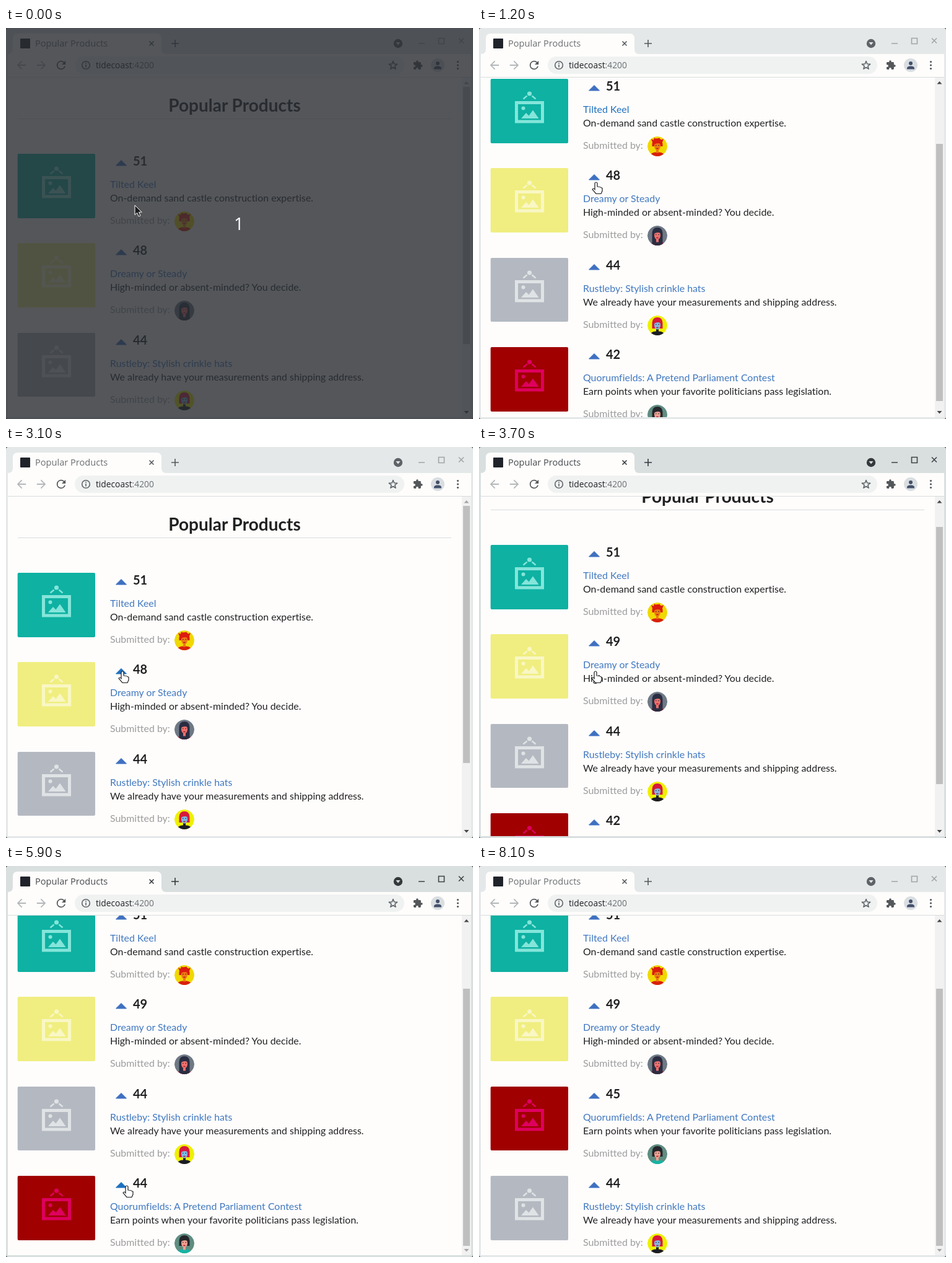
An HTML page for the animation above (8.3 s loop, 754 px wide and 631 px high).

```html
<!DOCTYPE html>
<html lang="en">
<head>
<meta charset="utf-8">
<title>Popular Products</title>
<style>
  html, body { margin: 0; width: 100%; height: 100%; overflow: hidden; background: #50555a; }
  svg { display: block; }
  text { font: 15.91px Lato, sans-serif; font-variant-ligatures: none; fill: #212121; white-space: pre; }
  .heading { font-size: 28px; font-weight: 700; text-anchor: middle; }
  .votes { font-size: 20px; font-weight: 700; }
  .link { fill: #4078c0; }
  .up { fill: #3f70c1; stroke: #3f70c1; stroke-width: 1; stroke-linejoin: round; }
  .link.hover { fill: #1e70bf; }
  .up.hover { fill: #1e70bf; stroke: #1e70bf; }
  .note { fill: #9c9c9c; }
  .ui { font-family: "Open Sans", "Noto Sans", sans-serif; }
  .tab { font-size: 14.6px; fill: var(--label); }
  .url { font-size: 13.8px; fill: #202124; }
  .count { font-size: 28px; fill: #fff; text-anchor: middle; }
  .line { fill: none; stroke-width: 1.6; }
  #window { --bar: #e4e8e8; --label: #6b6e70; --button: #a0a5a5; --badge: #5f6368; --plus: #55595c; }
  #window.active { --bar: #d9dfdf; --label: #46494c; --button: #3f4346; --badge: #35393c; --plus: #35393c; }
</style>
</head>
<body>
<svg id="stage" width="754" height="631" viewBox="0 0 754 631"></svg>
<script>
const LOOP = 8300, STEP = 100;
const FIRST_TOP = 203, PITCH = 144.33, IMAGE_HEIGHT = 103.6;

// Hair ends at `length`, measured down from the middle of the portrait.
const products = [
  { title: "Tilted Keel", text: "On-demand sand castle construction expertise.",
    back: "#0eb1a2", icon: "#84e5da", votes: [[0, 51]],
    face: { back: "#f0d800", hair: "#dc1c10", skin: "#f07a12", body: "#d8200c", length: 0, spikes: true } },
  { title: "Dreamy or Steady", text: "High-minded or absent-minded? You decide.",
    back: "#f0ee80", icon: "#f9f7c4", votes: [[0, 48], [3300, 49]],
    face: { back: "#6f7985", hair: "#2a2d42", skin: "#ee716d", body: "#d3222c", length: 16 } },
  { title: "Rustleby: Stylish crinkle hats", text: "We already have your measurements and shipping address.",
    back: "#b4b9c1", icon: "#e0e3e5", votes: [[0, 44]],
    face: { back: "#eef000", hair: "#d8183c", skin: "#7fb9e4", body: "#1b1b24", length: 5 } },
  { title: "Quorumfields: A Pretend Parliament Contest", text: "Earn points when your favorite politicians pass legislation.",
    back: "#a00000", icon: "#de005e", votes: [[0, 42], [5200, 43], [5900, 44], [7000, 45]],
    face: { back: "#5f8d80", hair: "#25262c", skin: "#f0a090", body: "#17b3a3", length: 4 } },
];

// Each row: time, value(s) held until the next row.
const scrolls = [[0, 0], [1200, 121], [1300, 136], [1700, 133], [1800, 122], [1900, 105], [2000, 82],
  [2100, 42], [2200, 6], [2400, 0], [3500, 4], [3600, 20], [3700, 45], [3800, 72], [3900, 98],
  [4000, 118], [4100, 130], [4200, 136]];
const pointers = [[0, 209, 287], [600, 203, 276], [700, 194, 258], [800, 189, 249], [2400, 189, 256],
  [2500, 189, 280], [2600, 188, 318], [2700, 187, 350], [2800, 187, 361], [3100, 188, 362],
  [4200, 188, 366], [4300, 198, 336], [4400, 198, 352], [4500, 196, 400], [4600, 194, 440],
  [4700, 193, 490], [4800, 194, 516], [5000, 194, 518], [5200, 195, 516], [7100, 205, 480],
  [7200, 235, 360], [7300, 290, 112], [7400, 300, -60]];
const veils = [[0, 1], [400, .85], [500, .66], [600, .46], [700, .26], [800, .1], [900, 0]];

const at = (rows, t) => rows.findLast(row => row[0] <= t);
const byId = id => document.getElementById(id);
const path = (d, attrs) => `<path d="${d}" ${attrs}/>`;
const rect = (x, y, w, h, fill, more = "") =>
  `<rect x="${x}" y="${y}" width="${w}" height="${h}" fill="${fill}" ${more}/>`;
const dot = (x, y, r, fill) => `<circle cx="${x}" cy="${y}" r="${r}" fill="${fill}"/>`;
const text = (x, y, cls, body) => `<text x="${x}" y="${y}" class="${cls}">${body}</text>`;
const icon = (x, y, scale, d, fill) =>
  path(d, `fill="${fill}" transform="translate(${x} ${y}) scale(${scale}) translate(-12 -12)"`);

const star = Array.from({ length: 10 }, (_, i) => {
  const a = i * Math.PI / 5 - Math.PI / 2, r = i % 2 ? 3 : 7;
  return `${625 + r * Math.cos(a)},${60.5 + r * Math.sin(a)}`;
}).join(" ");

function portrait(f) {
  const spikes = f.spikes ? path("M-10 -12l4 2 1-4 4 3 4-3 2 4 5-2-3 8h-14z", `fill="${f.hair}"`) : "";
  return `<g transform="translate(288 109)" clip-path="url(#round)">
    ${dot(0, 0, 16, f.back)}
    ${path("M-12 17Q-11 10 -3 9.500H3Q11 10 12 17Z", `fill="${f.body}"`)}
    ${path(`M-8.500 ${f.length}V-4Q-8 -13 0 -13T8.500 -4V${f.length}Z`, `fill="${f.hair}"`)}
    ${spikes}
    ${rect(-2, 4, 4, 6.5, f.length === 5 ? f.body : f.skin)}
    <ellipse cy="-.5" rx="5" ry="7.200" fill="${f.skin}"/>
    ${path("M-6 -3Q-4 -10 1 -9T6 -3Q2 -7 -6 -3Z", `fill="${f.hair}"`)}
    ${dot(-2.2, -1.5, .8, "#222")}${dot(2.2, -1.5, .8, "#222")}
    ${path("M-1.700 3.500h3.400", 'stroke="#b01828" stroke-width="1.300"')}
  </g>`;
}

function picture(p, i) {
  return rect(18.7, 0, 125.3, 104, p.back, `rx="2" id="image${i}"`) + dot(81.5, 24, 3.6, p.icon)
    + path("M77.500 27.500L71.500 32.500M85.500 27.500L91.500 32.500", `stroke="${p.icon}" stroke-width="2.400"`)
    + path("M58 36h47v35.500h-47zM63 41v25.500h37v-25.500z", `fill="${p.icon}" fill-rule="evenodd"`)
    + dot(71.5, 47.5, 3, p.icon)
    + path("M68 64l8-9 4.500 4.500 6.500-9 9.500 13.500z", `fill="${p.icon}"`);
}

const item = (p, i) => `<g id="item${i}">
  ${picture(p, i)}
  ${path("M177.500 19h17l-8.500-8.500z", `class="up" id="up${i}"`)}
  <text x="205" y="19" class="votes" id="votes${i}"></text>
  <text x="168" y="55" class="link" id="link${i}">${p.title}</text>
  ${text(168, 77, "", p.text)}
  ${text(168, 113, "note", "Submitted by:")}
  ${portrait(p.face)}
</g>`;

const BACK = "M20 11H7.830l5.590-5.590L12 4l-8 8 8 8 1.410-1.410L7.830 13H20z";
const RELOAD = "M17.650 6.350A7.960 7.960 0 0 0 12 4a8 8 0 1 0 7.730 10h-2.080A6 6 0 1 1 12 6c1.660 0 3.140.690 4.220 1.780L13 11h7V4z";
const PUZZLE = "M20.500 11H19V7a2 2 0 0 0-2-2h-4V3.500a2.500 2.500 0 0 0-5 0V5H4a2 2 0 0 0-2 2v3.800h1.500a2.700 2.700 0 0 1 0 5.400H2V20a2 2 0 0 0 2 2h3.800v-1.500a2.700 2.700 0 0 1 5.400 0V22H17a2 2 0 0 0 2-2v-4h1.500a2.500 2.500 0 0 0 0-5z";

const tabStrip = `
  ${rect(0, 0, 754, 631, "var(--bar)", 'rx="4"')}
  ${rect(3, 42, 748, 586, "#fefdfc")}
  ${path("M3 42Q11 42 11 34V17Q11 9 19 9H243Q251 9 251 17V34Q251 42 259 42Z", 'fill="#fefdfc"')}
  ${rect(23, 17, 16, 16, "#20232a", 'rx="1"')}
  ${text(47, 30, "ui tab", "Popular Products")}
  ${path("M231.500 21.500l7 7m0-7l-7 7M267 25h12M273 19v12", 'class="line" stroke="var(--plus)"')}
  ${dot(633, 25, 7.2, "var(--badge)")}
  ${path("M629.500 23h7l-3.500 4.500z", 'fill="var(--bar)"')}
  ${path("M666 25h10M698.500 16.500h9v9h-9zM731 16.500l8 8m0-8l-8 8", 'class="line" stroke="var(--button)"')}`;

const toolbar = `
  ${icon(25, 60, .9, BACK, "#b4b7b8")}
  <g transform="translate(114 0) scale(-1 1)">${icon(57, 60, .9, BACK, "#b4b7b8")}</g>
  ${icon(89, 60, .9, RELOAD, "#54585b")}
  ${rect(111, 46, 532, 28, "#eff2f1", 'rx="14"')}
  <circle cx="129" cy="60" r="6.300" class="line" stroke="#5f6368"/>
  ${rect(128.2, 59, 1.6, 4.5, "#5f6368")}${rect(128.2, 56, 1.6, 1.7, "#5f6368")}
  <text x="145" y="65" class="ui url">tidecoast<tspan fill="#6b6f72">:4200</tspan></text>
  <polygon points="${star}" class="line" stroke="#5f6368" stroke-linejoin="round"/>
  ${icon(665, 60, .7, PUZZLE, "#54585b")}
  ${dot(697, 60, 11, "#d9dee1")}${dot(697, 57, 3, "#44506a")}
  ${path("M691 66.500v-1.500q0-3.500 6-3.500t6 3.500v1.500z", 'fill="#44506a"')}
  ${[54.5, 60, 65.5].map(y => dot(729.5, y, 1.6, "#54585b")).join("")}
  ${rect(3, 79, 748, 1, "#d8dbdb")}`;

byId("stage").innerHTML = `
  <defs><clipPath id="round"><circle r="16"/></clipPath></defs>
  <g id="window">${tabStrip}${toolbar}
    <svg x="0" y="80" width="736" height="548" overflow="hidden"><g id="page">
      ${text(369, 135, "heading", "Popular Products")}
      ${rect(19, 146, 700, 1, "#dcdcdc")}
      ${products.map(item).join("")}
    </g></svg>
    ${rect(736, 80, 15, 548, "#f0f1f0")}
    ${rect(738, 95, 11, 415, "#bfbfbf", 'id="thumb"')}
    ${path("M739.500 90.500h8l-4-4.500z", 'id="upper"')}
    ${path("M739.500 618h8l-4 4.500z", 'id="lower"')}
  </g>
  <g id="veil">${rect(0, 0, 754, 631, "#2a2d32", 'fill-opacity=".8"')}${text(376, 326, "ui count", "1")}</g>
  <g id="pointer">
    ${path("M-1 -1V14.500L2.700 11.200 5.200 17 8 15.800 5.500 10.200H10.200Z", 'id="arrow" fill="#1c1c1c" stroke="#fff" stroke-width="1"')}
    ${path("M-2 2a2 2 0 0 1 4 0V7q5 0 8 2.500v4.500l-2 4.500H0l-6-7q1.500-3 4 0z", 'id="hand" fill="#fff" stroke="#1c1c1c" stroke-width="1.200"')}
  </g>`;

// Exact, unrounded top of a product on the page.
const itemTop = (i, t) => FIRST_TOP + PITCH * (t >= 7000 && i > 1 ? 5 - i : i);

// Names the part under the pointer, such as "up2" or "link0".
function hit(t) {
  const [, x, y] = at(pointers, t), scroll = at(scrolls, t)[1];
  for (let i = 0; i < products.length; i++) {
    const dy = y - itemTop(i, t) + scroll;
    if (x > 176 && x < 197 && dy > 7 && dy < 23) return "up" + i;
    if (x > 168 && x < 240 && dy > 42 && dy < 60) return "link" + i;
  }
  return "";
}

function draw(t) {
  const scroll = at(scrolls, t)[1], [, x, y] = at(pointers, t);
  const hovered = hit(Math.max(0, t - STEP)), over = hit(t);
  byId("window").classList.toggle("active", t >= 3200 && t < 8100);
  byId("page").setAttribute("transform", `translate(0 ${-80 - scroll})`);
  products.forEach((p, i) => {
    const top = itemTop(i, t), snapped = Math.round(top);
    byId("item" + i).setAttribute("transform", `translate(0 ${snapped})`);
    byId("image" + i).setAttribute("height", Math.round(top + IMAGE_HEIGHT) - snapped);
    byId("votes" + i).textContent = at(p.votes, t)[1];
    for (const id of ["up" + i, "link" + i]) byId(id).classList.toggle("hover", id === hovered);
  });
  byId("thumb").setAttribute("y", 95 + Math.round(scroll * .757));
  byId("upper").setAttribute("fill", scroll > 0 ? "#484848" : "#a5a5a5");
  byId("lower").setAttribute("fill", scroll < 136 ? "#484848" : "#a5a5a5");
  byId("veil").setAttribute("opacity", at(veils, t)[1]);
  byId("pointer").setAttribute("transform", `translate(${x} ${y})`);
  byId("hand").style.display = over ? "" : "none";
  byId("arrow").style.display = over ? "none" : "";
}

const start = performance.now();
function tick() {
  const t = (performance.now() - start) % LOOP;
  draw(Math.floor(t / STEP) * STEP);
  requestAnimationFrame(tick);
}
tick();
</script>
</body>
</html>
```
